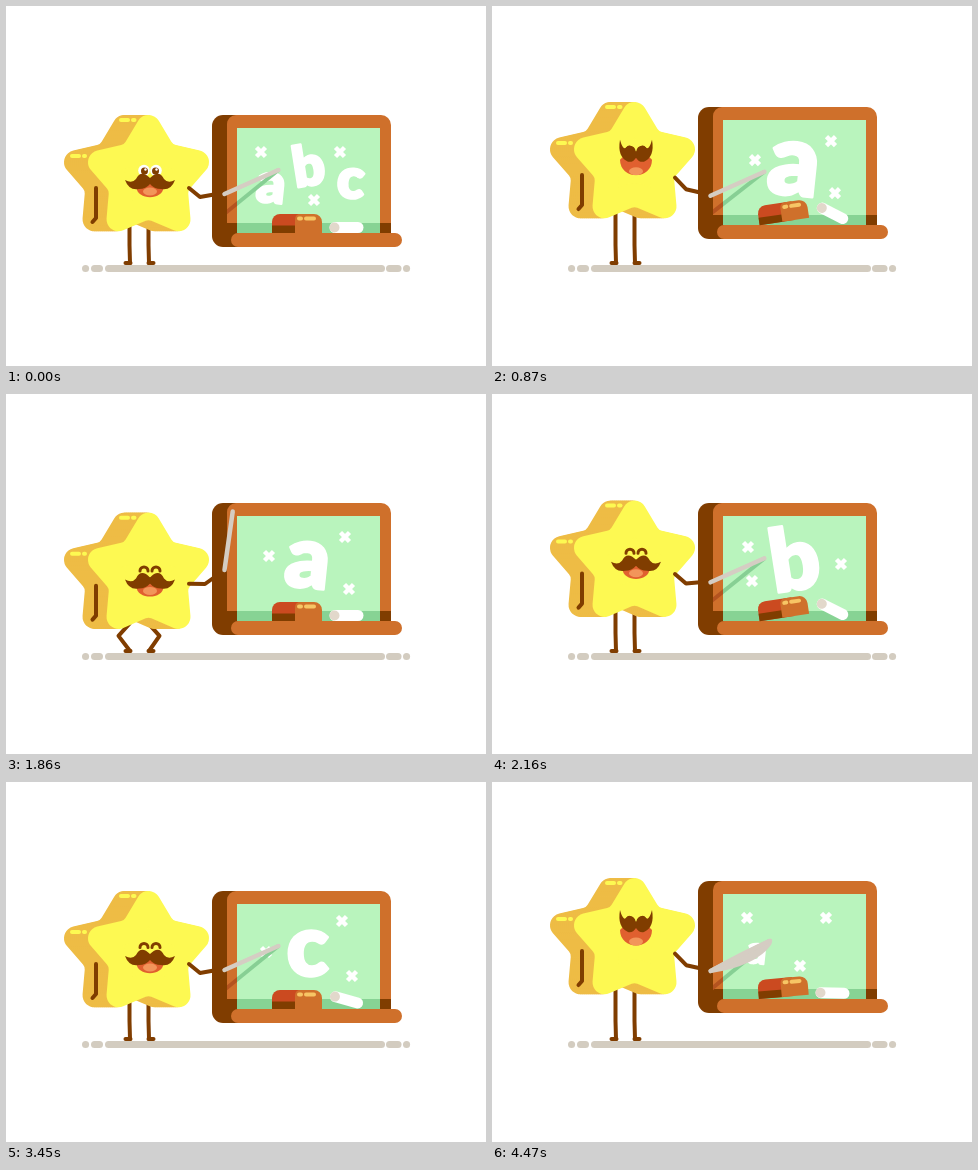
An HTML page with a canvas for the animation above (4.5 s loop, 480 by 360 pixels).

```html
<!DOCTYPE html>
<html lang="en">
<head>
<meta charset="utf-8">
<title>Star teacher</title>
<style>
html, body { margin: 0; width: 100%; height: 100%; overflow: hidden; background: #fff; }
canvas { display: block; }
</style>
</head>
<body>
<canvas width="480" height="360"></canvas>
<script>
const ctx = document.querySelector('canvas').getContext('2d');
const LOOP = 4500, BEAT = 1220, SWAP = 787;
const BROWN = '#803d00', ORANGE = '#cf702b', YELLOW = '#fdf952', GOLD = '#eebc45', GREY = '#d5cdc3';

const clamp = v => Math.min(1, Math.max(0, v));
const ramp = (p, from, to) => {
  const u = clamp((p - from) / (to - from));
  return u * u * (3 - 2 * u);
};
// Rises from a to b, falls from c to d.
const pulse = (p, a, b, c, d) => ramp(p, a, b) * (1 - ramp(p, c, d));
const overshoot = u => 1 + 3.2 * (u - 1) ** 3 + 2.2 * (u - 1) ** 2;

// Every beat: crouch, swing the pointer up, then jump and strike the board.
function poseAt(p) {
  const crouch = pulse(p, 340, 500, 620, 715);
  const jump = pulse(p, 715, 840, 840, 975);
  const raise = pulse(p, 370, 450, 755, 820);
  return {
    raise,
    star: 11 * crouch - 15 * jump,
    face: 13 * crouch - 26 * pulse(p, 700, 815, 815, 1000),
    lift: pulse(p, 715, 795, 875, 935),
    board: -12 * pulse(p, 755, 830, 830, 935),
    angle: -24 - 58 * raise,
    hand: 188 - 12 * raise + 2 * jump,
    chalk: 27 * pulse(p, 800, 870, 960, 1075),
    eraser: -8.5 * pulse(p, 775, 840, 945, 1005),
    swinging: p > 770 && p < 835
  };
}

// Letters: [glyph, x, y, tilt]
const scenes = [
  { size: 56, letters: [['a', 264, 181.5, 6], ['b', 302.5, 158, -9], ['c', 345, 177, 4]], marks: [[255, 146], [334, 146], [308, 194]] },
  { size: 87, letters: [['a', 300, 171, 6]], marks: [[339, 143], [343, 195], [263, 162]] },
  { size: 87, letters: [['b', 303, 163.5, -9]], marks: [[256, 153], [260, 187], [349, 170]] },
  { size: 87, letters: [['c', 302.5, 171, 0]], marks: [[336, 139], [346, 194], [260, 170]] }
];

function box(x, y, w, h, r, color) {
  ctx.fillStyle = color;
  ctx.beginPath();
  ctx.roundRect(x, y, w, h, r);
  ctx.fill();
}

function line(points, color, width, cap = 'round') {
  ctx.strokeStyle = color;
  ctx.lineWidth = width;
  ctx.lineCap = cap;
  ctx.lineJoin = 'round';
  ctx.beginPath();
  points.forEach(([x, y]) => ctx.lineTo(x, y));
  ctx.stroke();
}

const dash = (x, y, length, color, width) => line([[x, y], [x + length, y]], color, width);

function dot(x, y, r, color, ry = r) {
  ctx.fillStyle = color;
  ctx.beginPath();
  ctx.ellipse(x, y, r, ry, 0, 0, 7);
  ctx.fill();
}

function placed(x, y, degrees, scale, draw) {
  ctx.save();
  ctx.translate(x, y);
  ctx.rotate(degrees * Math.PI / 180);
  ctx.scale(scale, scale);
  draw();
  ctx.restore();
}

function glyph([char, x, y, tilt], size, scale) {
  placed(x, y, tilt, scale, () => {
    ctx.font = `900 ${size}px Lato, sans-serif`;
    const m = ctx.measureText(char);
    const dx = (m.actualBoundingBoxLeft - m.actualBoundingBoxRight) / 2;
    const dy = (m.actualBoundingBoxAscent - m.actualBoundingBoxDescent) / 2;
    ctx.fillStyle = ctx.strokeStyle = '#fff';
    ctx.lineWidth = 2.5;
    ctx.lineJoin = 'round';
    ctx.fillText(char, dx, dy);
    ctx.strokeText(char, dx, dy);
  });
}

function mark([x, y], scale) {
  placed(x, y, 0, scale, () => {
    for (const s of [-4.5, 4.5]) line([[-4.5, s], [4.5, -s]], '#fff', 4.5, 'butt');
  });
}

function drawGround() {
  for (const [x, length] of [[79.5, .1], [88.5, 5], [102.5, 273], [383.5, 8.5], [400.5, .1]])
    dash(x, 262.5, length, '#d3ccc0', 7);
}

function drawBoard({ size, letters, marks }, p, pose) {
  ctx.save();
  ctx.translate(0, pose.board);
  box(206, 109, 40, 132, 11, BROWN);
  box(221, 109, 164, 108, [9, 10, 0, 0], ORANGE);
  box(221, 217, 164, 10, 0, BROWN);
  box(231, 122, 143, 95, 0, '#b9f4bd');
  box(231, 217, 143, 10, 0, '#87d394');
  box(225, 227, 171, 14, 7, ORANGE);

  const fresh = p >= SWAP;
  const leaving = clamp((SWAP - p) / 52);
  marks.forEach(m => mark(m, fresh ? clamp((p - SWAP) / 20) : leaving));
  letters.forEach((letter, i) => {
    const scale = fresh ? overshoot(clamp((p - SWAP - i * 25) / 143)) : leaving;
    if (scale > 0) glyph(letter, size, scale);
  });

  placed(291, 217.5 + pose.eraser * .4, pose.eraser, 1, () => {
    box(-25, -9.5, 35, 19, [8, 0, 0, 0], '#cb4a20');
    box(-25, 2, 25, 7.5, 0, BROWN);
    box(-2, -9.5, 27, 19, [5, 8, 0, 0], ORANGE);
    dash(2, -5, 2, '#f7c565', 4);
    dash(9, -5, 8, '#f7c565', 4);
  });
  placed(340.5, 221.5 - pose.chalk * .23, pose.chalk, 1, () => {
    box(-17, -5.5, 34, 11, 5.5, '#fff');
    dot(-12, 0, 5, '#e2d8cb');
  });
  ctx.restore();
}

// Five-pointed star with rounded tips and soft inner corners.
function starShape(dx, color) {
  const point = i => {
    const a = (i * 36 - 90) * Math.PI / 180, r = i % 2 ? 28.5 : 51;
    return [142.5 + dx + r * Math.cos(a), 172 + r * Math.sin(a)];
  };
  const near = (tip, inner) => tip.map((v, k) => v + (inner[k] - v) * .75);
  ctx.beginPath();
  for (let i = 0; i < 10; i += 2) {
    const tip = point(i), inner = point(i + 1), next = point(i + 2);
    ctx.lineTo(...tip);
    ctx.lineTo(...near(tip, inner));
    ctx.quadraticCurveTo(...inner, ...near(next, inner));
  }
  ctx.closePath();
  ctx.fillStyle = ctx.strokeStyle = color;
  ctx.lineWidth = 24;
  ctx.lineJoin = 'round';
  ctx.fill();
  ctx.stroke();
}

// Right half of the moustache: centre, then control and end points.
const RESTING = [[0, -2], [9, -11], [14, -1], [18, 4], [25, 0], [21, 11], [11, 9], [4, 9], [0, 4]];
const RAISED = [[0, -8], [6, -18], [10, -12], [13, -9], [16, -20], [19, -3], [8, 2], [3, 3], [0, -2]];

function drawMoustache(lift) {
  const pts = RESTING.map((pt, i) => pt.map((v, k) => v + (RAISED[i][k] - v) * lift));
  ctx.fillStyle = BROWN;
  for (const side of [1, -1]) {
    ctx.save();
    ctx.scale(side, 1);
    ctx.beginPath();
    ctx.moveTo(...pts[0]);
    for (let i = 1; i < pts.length; i += 2) ctx.quadraticCurveTo(...pts[i], ...pts[i + 1]);
    ctx.lineTo(-1, pts[8][1]);
    ctx.lineTo(-1, pts[0][1]);
    ctx.fill();
    ctx.restore();
  }
}

function drawFace({ face, lift }, eyesOpen) {
  ctx.save();
  ctx.translate(144, 174 + face);
  for (const x of [-6, 6]) {
    if (eyesOpen) {
      dot(x, -9.5, 5.8, '#fff');
      dot(x * .92, -9, 3.5, BROWN);
      dot(x * .92 + 1, -10.5, 1.2, '#fff');
    } else {
      ctx.strokeStyle = BROWN;
      ctx.lineWidth = 3;
      ctx.lineCap = 'round';
      ctx.beginPath();
      ctx.arc(x, -8.5, 4, Math.PI, 0);
      ctx.stroke();
    }
  }
  const w = 13.5 + 2.5 * lift, top = 7 - 7 * lift;
  ctx.fillStyle = '#e0602f';
  ctx.beginPath();
  ctx.moveTo(-w, top);
  ctx.bezierCurveTo(-w, 20.5, w, 20.5, w, top);
  ctx.lineTo(w - 4, top - 4);
  ctx.lineTo(4 - w, top - 4);
  ctx.fill();
  dot(0, 11.5, 7, '#f2955a', 4);
  drawMoustache(lift);
  ctx.restore();
}

function drawStar(pose, eyesOpen) {
  const { star } = pose, bend = Math.max(0, star), knee = Math.min(11, bend * 1.35);
  for (const [x, side, foot] of [[123.5, -1, 119.5], [142.5, 1, 142.5]]) {
    line([[x, 214 + star], [x, 220 + star], [x + side * knee, 239 + bend * .3], [x + .5, 257]], BROWN, 4);
    dash(foot, 257, 5, BROWN, 4);
  }
  ctx.save();
  ctx.translate(0, star);
  for (let dx = -24; dx < 0; dx += 2) starShape(dx, GOLD);
  starShape(0, YELLOW);
  dash(115, 114, 7, YELLOW, 4);
  dash(127, 114, 1.5, YELLOW, 4);
  dash(66, 150, 7, YELLOW, 4);
  dash(78, 150, 1, YELLOW, 4);
  line([[90, 182], [90, 212], [86.5, 216]], BROWN, 4);
  ctx.restore();
  drawFace(pose, eyesOpen);
}

function drawPointer({ star, angle, hand, raise, swinging }) {
  const a = angle * Math.PI / 180, reach = swinging ? 66 : 59;
  const base = [218.5, hand];
  const tip = [base[0] + reach * Math.cos(a), base[1] + reach * Math.sin(a)];
  const up = Math.min(0, star);

  line([[183, 182 + star * .8], [194 + raise * 5, 191 + up * .6 - raise],
    [208, 188.5 - raise * 5 + up * .15], base], BROWN, 4);

  if (angle > -45) {
    // The shadow changes colour where the frame meets the screen.
    const shade = ctx.createLinearGradient(230.9, 0, 231.1, 0);
    shade.addColorStop(0, '#b4531f');
    shade.addColorStop(1, '#87cf94');
    ctx.save();
    ctx.beginPath();
    ctx.rect(221, 109, 154, 118);
    ctx.clip();
    line([[217, 209], tip], shade, 4, 'butt');
    ctx.restore();
  }
  if (swinging) {
    placed(...base, angle, 1, () => {
      ctx.fillStyle = GREY;
      ctx.beginPath();
      ctx.moveTo(0, -2);
      ctx.quadraticCurveTo(35, -4, 68, -2);
      ctx.quadraticCurveTo(71, 0, 66, 4);
      ctx.quadraticCurveTo(43, 16, 0, 2);
      ctx.fill();
    });
  }
  line([base, tip], GREY, 4.5);
}

function frame(time) {
  const t = time % LOOP, p = t % BEAT, beat = Math.floor(t / BEAT);
  const pose = poseAt(p);
  const scene = scenes[(beat + (p >= SWAP ? 1 : 0)) % scenes.length];

  // Letters only shrink just before the swap.
  ctx.clearRect(0, 0, 480, 360);
  drawGround();
  drawBoard(scene, p, pose);
  drawStar(pose, beat === 0 && p < 480);
  drawPointer(pose);
  requestAnimationFrame(frame);
}
requestAnimationFrame(frame);
</script>
</body>
</html>
```
